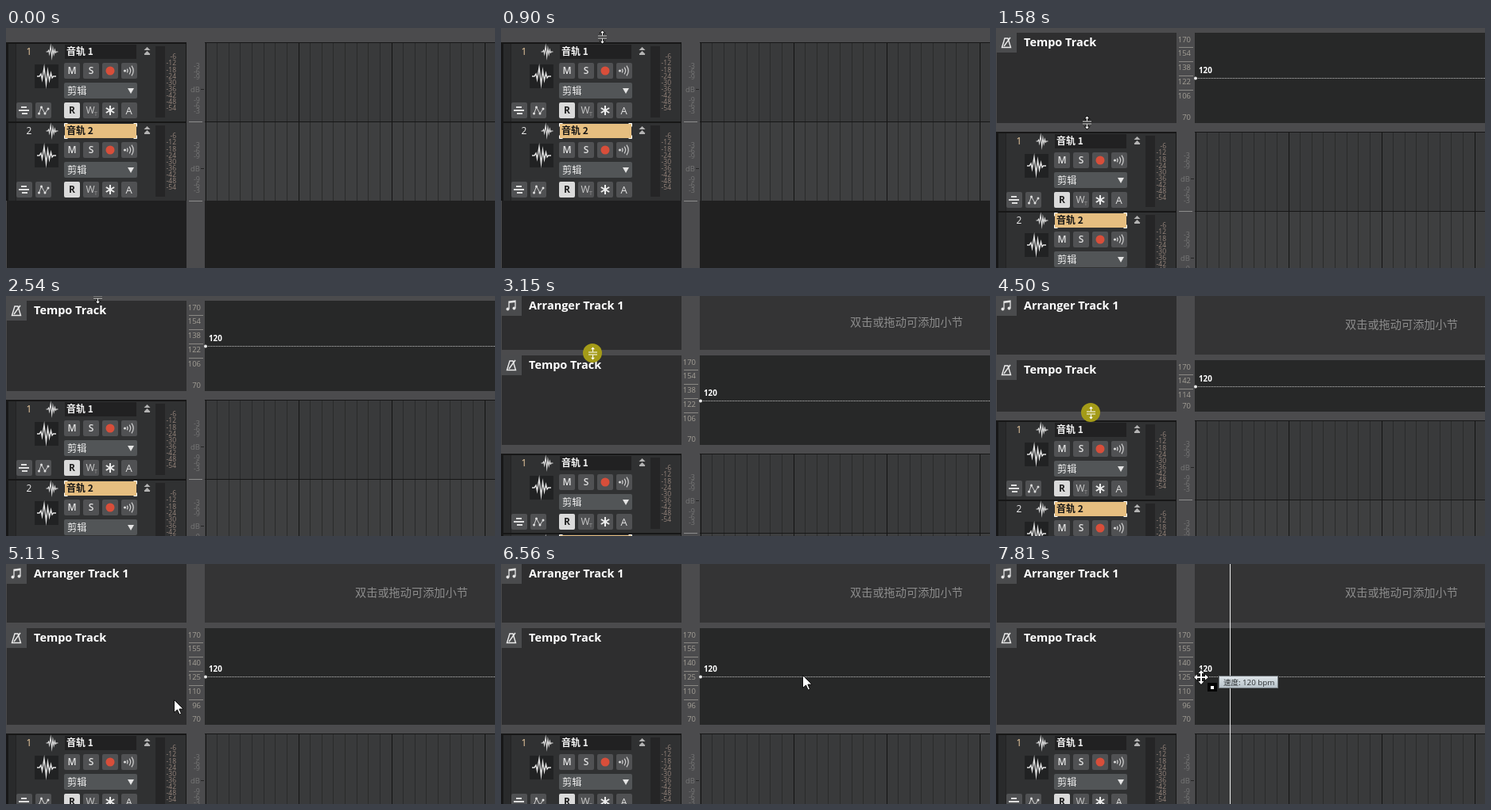
Animation, 615 px wide and 303 px high, one loop 8 s. Source, as an HTML page with a canvas:

```html
<!DOCTYPE html>
<html lang="zh">
<head>
<meta charset="utf-8">
<style>
html, body { margin: 0; width: 100%; height: 100%; overflow: hidden; background: #4b4b4d; }
canvas { display: block; width: 615px; height: 303px; }
</style>
</head>
<body>
<canvas id="stage" width="615" height="303"></canvas>
<script>
const W = 615, H = 303, LOOP = 8000;
const c = document.getElementById('stage').getContext('2d');
const SANS = '"Open Sans", "Noto Sans", sans-serif';
const CJK = '"Noto Sans CJK SC", "Noto Sans CJK", sans-serif';
const GRAY = '#4b4b4d', EDGE = '#171717';

// Bursts of activity: start, end, number of screen updates
const BURSTS = [
  [130, 900, 12], [1100, 1380, 5], [1580, 2200, 9], [2400, 2540, 3],
  [2940, 3150, 4], [3220, 3690, 7], [3760, 3760, 1], [4160, 4500, 5],
  [4700, 5110, 7], [5180, 5380, 4], [5510, 5920, 6], [6220, 6910, 10], [7180, 7810, 10]
];

// Pointer: time, x, y, look
const POINTER = [
  [0, 318, 248, 'none'], [130, 318, 248, 'arrow'], [480, 190, 90, 'arrow'],
  [760, 129, 16, 'arrow'], [830, 127, 11, 'size'], [1100, 127, 11, 'size drag'],
  [1170, 126, 16, 'size drag'], [1380, 113, 119, 'size drag'],
  [1580, 114, 119, 'size'], [1720, 114, 110, 'arrow'], [2200, 114, 9, 'arrow'],
  [2400, 114, 6, 'arrow'], [2470, 115, 1, 'size'], [2940, 115, 4, 'size drag'],
  [3150, 115, 72, 'size drag'], [3220, 115, 79, 'size drag'], [3300, 115, 82, 'arrow'],
  [3690, 116, 186, 'arrow'], [3760, 118, 195, 'size'], [4160, 118, 192, 'size drag'],
  [4415, 119, 145, 'size drag'], [4700, 119, 152, 'size drag'], [4904, 119, 202, 'size drag'],
  [4970, 125, 200, 'arrow'], [5110, 211, 171, 'arrow'], [5380, 258, 122, 'arrow'],
  [5920, 345, 135, 'arrow'], [6450, 421, 140, 'arrow'], [6680, 294, 140, 'arrow drag'],
  [6750, 292, 139, 'arrow'], [6910, 258, 130, 'arrow'], [7180, 257, 124, 'arrow'],
  [7380, 258, 143, 'move'], [7510, 258, 143, 'move drag'], [7730, 258, 143, 'move tip']
];

// Lane edges: time, arranger bottom, tempo bottom
const LANES = [
  [0, -1, 7], [1380, -1, 7], [1580, -1, 120], [2870, -1, 120], [3150, 68, 188],
  [3220, 74, 196], [4100, 74, 196], [4415, 74, 146], [4640, 74, 146], [4904, 74, 203]
];

function screenTime(t) {
  let held = 0;
  for (const [a, b, n] of BURSTS) {
    if (t < a) break;
    const gap = n > 1 ? (b - a) / (n - 1) : 1;
    held = Math.min(b, a + Math.floor((t - a) / gap + 1e-6) * gap);
  }
  return held;
}

function sample(keys, t) {
  let i = keys.length - 1;
  while (i > 0 && keys[i][0] > t + 1e-6) i--;
  const k = keys[i], n = keys[i + 1];
  if (!n) return k.slice(1);
  const p = (t - k[0]) / (n[0] - k[0]);
  return k.slice(1).map((v, j) =>
    typeof v === 'number' ? Math.round(v + (n[j + 1] - v) * p) : v);
}

function box(x, y, w, h, fill) { c.fillStyle = fill; c.fillRect(x, y, w, h); }

function text(s, x, y, size, color, { weight = 400, align = 'left', font = SANS } = {}) {
  c.font = `${weight} ${size}px ${font}`;
  c.textAlign = align;
  c.fillStyle = color;
  c.fillText(s, x, y + size * 0.37);
}

function path(points, color, width = 1, close = false, fill = null) {
  c.beginPath();
  points.forEach(([x, y]) => c.lineTo(x, y));
  if (close) c.closePath();
  if (fill) { c.fillStyle = fill; c.fill(); }
  if (color) { c.strokeStyle = color; c.lineWidth = width; c.stroke(); }
}

function disc(x, y, r, fill) {
  c.beginPath(); c.arc(x, y, r, 0, 7); c.fillStyle = fill; c.fill();
}

function clipped(x, y, w, h, draw) {
  if (h <= 0) return;
  c.save();
  c.beginPath(); c.rect(x, y, w, h); c.clip();
  draw();
  c.restore();
}

function panel(x, y, w, h, fill) {
  c.beginPath(); c.roundRect(x, y, w, h, 2); c.fillStyle = fill; c.fill();
}

function button(x, y, fill = '#505153') { panel(x, y, 20, 20, fill); }

function wave(x, y, k) {
  const points = [[-12, 0], [-9, 0], [-7, -3], [-5.5, 4], [-3, -11], [-0.5, 10],
    [1.5, -7], [3.5, 5], [5.5, -4], [7, 2], [8.5, 0], [12, 0]];
  path(points.map(([u, v]) => [x + u * k, y + v * k]), '#e2e2e2', Math.max(1.1, 1.4 * k));
}

function track(y, n, selected) {
  box(0, y, 227, 100, EDGE);
  box(3, y + 2, 223, 98, '#303132');
  box(3, y + 2, 9, 98, '#292a2b');
  box(12, y + 2, 1, 98, '#232324');

  text(n, 29, y + 12, 12, n === 1 ? '#f0cfa4' : '#ececec', { align: 'center' });
  wave(58, y + 12, 0.62);
  box(74, y + 3, 90, 18, selected ? '#e6be80' : '#212122');
  text('音轨 ' + n, 76, y + 12, 12, selected ? '#161616' : '#f4f4f4', { weight: 700, font: CJK });
  if (selected) {
    for (const [x, d] of [[73.5, 1], [164.5, -1]])
      for (const [v, e] of [[y + 2.5, 1], [y + 21.5, -1]])
        path([[x + d * 4, v], [x, v], [x, v + e * 4]], '#ffffff');
  }
  for (const v of [7, 12])
    path([[173.5, y + v + 3], [177.5, y + v - 1], [181.5, y + v + 3]], null, 1, true, '#b4b4b4');
  box(174, y + 15, 7, 1, '#b4b4b4');

  box(36, y + 28, 30, 30, '#212223');
  wave(51, y + 43, 1);

  const r1 = y + 26, r3 = y + 76;
  [73, 97, 121, 145].forEach(x => button(x, r1));
  text('M', 83, r1 + 10, 12, '#e4e4e4', { weight: 600, align: 'center' });
  text('S', 107, r1 + 10, 12, '#e4e4e4', { weight: 600, align: 'center' });
  disc(131, r1 + 10, 5.5, '#d84e3a');
  disc(149.5, r1 + 10, 1.6, '#d8d8d8');
  for (const r of [4, 7.5, 11]) {
    c.beginPath(); c.arc(149, r1 + 10, r, -0.62, 0.62);
    c.strokeStyle = '#d0d0d0'; c.lineWidth = 1.2; c.stroke();
  }

  panel(73, y + 51, 92, 20, '#525557');
  text('剪辑', 77, y + 61, 12.2, '#f0f0f0', { font: CJK });
  path([[153, y + 58], [161, y + 58], [157, y + 65]], null, 1, true, '#e4e4e4');

  [13, 37, 97, 121, 145].forEach(x => button(x, r3));
  button(73, r3, '#dadada');
  text('R', 83, r3 + 10, 12, '#202020', { weight: 700, align: 'center' });
  text('W', 106, r3 + 10, 12, '#cacaca', { align: 'center' });
  text('T', 113, r3 + 14, 7, '#9a9a9a', { align: 'center' });
  for (let i = 0; i < 3; i++) {
    const a = Math.PI / 2 + i * Math.PI / 3, dx = 6 * Math.cos(a), dy = 6 * Math.sin(a);
    path([[131 - dx, r3 + 10 - dy], [131 + dx, r3 + 10 + dy]], '#ececec', 2);
  }
  text('A', 154.5, r3 + 10, 13, '#e2e2e2', { align: 'center' });
  box(19, r3 + 5, 7, 2, '#dedede');
  box(16, r3 + 9, 8, 2, '#dedede');
  box(21, r3 + 9, 8, 2, '#dedede');
  box(20, r3 + 13, 7, 2, '#dedede');
  const dots = [[41.5, r3 + 14], [44.5, r3 + 6], [49, r3 + 14], [53, r3 + 8]];
  path(dots, '#d4d4d4');
  dots.forEach(([x, v]) => disc(x, v, 1.5, '#e0e0e0'));

  box(188, y + 5, 12, 90, '#252526');
  for (let i = 1; i <= 9; i++)
    text(-6 * i, 214, y + 10 + 8.15 * i, 8.5, '#94837a', { align: 'right' });

  const dim = '#757575';
  [3, 6, 9].forEach((v, i) => {
    text('-' + v, 244, y + 30 + 7 * i, 9, dim, { align: 'right' });
    text('-' + v, 244, y + 87 - 7 * i, 9, dim, { align: 'right' });
  });
  text('dB', 244, y + 59, 9.5, dim, { align: 'right' });
  box(245, y + 59, 4, 1, '#242424');
  box(230, y + 100, 17, 1, '#8c8c8c');

  box(250, y, W - 250, 100, selected ? '#3e3f40' : '#393a3b');
  for (let i = 0; i < 25; i++)
    box(Math.floor(251 + i * 14.625), y, 1, 100, i % 8 ? '#2a2b2b' : '#131313');
  box(250, y, W - 250, 1, EDGE);
}

function lane(top, bottom, title, icon, rightFill) {
  clipped(0, top, W, bottom - top, () => {
    box(1, top, 226, bottom - top, '#2e2e2f');
    box(250, top, W - 250, bottom - top, rightFill);
    box(1, top, 25, 25, '#4a4b4d');
    icon(13, top + 12);
    text(title, 35, top + 12, 14.5, '#ffffff', { weight: 700 });
  });
}

function noteIcon(x, y) {
  path([[x - 3, y + 4], [x - 3, y - 5], [x + 5, y - 6], [x + 5, y + 3]], '#e4e4e4', 1.3);
  path([[x - 3, y - 4], [x + 5, y - 5]], '#e4e4e4', 2);
  disc(x - 4.5, y + 4.5, 2, '#e4e4e4');
  disc(x + 3.5, y + 3.5, 2, '#e4e4e4');
}

function metronomeIcon(x, y) {
  path([[x - 5.5, y + 6.5], [x - 2, y - 5], [x + 2, y - 5], [x + 5.5, y + 6.5]], '#ececec', 1.4, true);
  path([[x - 3, y + 5], [x + 5, y - 6]], '#ececec', 1.4);
}

function tempoLane(top, bottom) {
  lane(top, bottom, 'Tempo Track', metronomeIcon, '#272828');
  const style = { align: 'right' }, color = '#a39f96';
  const span = bottom - top - 1, last = bottom - 8;
  for (let k = 0; top + 8 + 18 * k < last - 10; k++) {
    text(Math.round(170 - 1800 * k / span), 245, top + 8 + 17.9 * k, 9.5, color, style);
    if (k) box(230, top + 18 * k, 18, 1, '#8a8884');
  }
  text(70, 245, last, 9.5, color, style);

  const y = Math.round((top + bottom) / 2);
  c.fillStyle = '#c4c4c4';
  for (let x = 250; x < W; x += 2) c.fillRect(x, y, 1, 1);
  disc(251, y + 0.5, 2, '#e8e8e8');
  text('120', 255, y - 9.5, 9.8, '#ffffff', { weight: 700 });
}

function arrangerLane(bottom) {
  lane(0, bottom, 'Arranger Track 1', noteIcon, '#343435');
  clipped(250, 0, W - 250, bottom, () =>
    text('双击或拖动可添加小节', 439, bottom / 2 - 1, 14.2, '#8c8c8c', { font: CJK }));
}

function outlined(draw, edge = 1.6) {
  if (edge) draw('#101010', edge);
  draw('#ffffff', 0);
}

function sizeCursor(x, y, drag) {
  outlined((col, o) => {
    const w = 1 + o;
    for (const d of [-1, 1]) {
      path([[x - 5.5, y + d * 1.5], [x + 5.5, y + d * 1.5]], col, w);
      path([[x, y + d * 2], [x, y + d * 6]], col, w);
      path([[x - 2.5, y + d * 5.2], [x + 2.5, y + d * 5.2], [x, y + d * 8]], o ? col : null, o, true, col);
    }
  }, drag ? 0 : 1.6);
}

function moveCursor(x, y) {
  outlined((col, o) => {
    path([[x - 7, y], [x + 7, y]], col, 2 + o);
    path([[x, y - 7], [x, y + 7]], col, 2 + o);
    for (const [u, v] of [[1, 0], [-1, 0], [0, 1], [0, -1]])
      path([[x + u * 5 - v * 3.5, y + v * 5 - u * 3.5], [x + u * 9, y + v * 9],
        [x + u * 5 + v * 3.5, y + v * 5 + u * 3.5]], o ? col : null, o, true, col);
  });
  box(x + 8, y + 7, 12, 11, '#050505');
  box(x + 12, y + 11, 4, 4, '#ffffff');
}

function arrowCursor(x, y) {
  path([[0, 0], [0, 16], [4, 12.5], [6.7, 18.5], [9, 17.5], [6.4, 11.6], [11.5, 11.5]]
    .map(([u, v]) => [x + u + 0.5, y + v + 0.5]), '#101010', 1, true, '#ffffff');
}

function tooltip(x, y) {
  const g = c.createLinearGradient(0, y, 0, y + 16);
  g.addColorStop(0, '#dfe6ea');
  g.addColorStop(1, '#b6c1c8');
  box(x, y, 75, 16, '#6f7579');
  box(x + 1, y + 1, 73, 14, g);
  text('速度:', x + 6, y + 8, 9.5, '#2c3032', { font: CJK });
  text('120 bpm', x + 30, y + 8, 9.8, '#2c3032');
}

function pointer(x, y, look) {
  const drag = look.includes('drag');
  if (drag) disc(x, y, 12, '#a49b18');
  if (look.startsWith('size')) sizeCursor(x + 0.5, y + 0.5, drag);
  if (look.startsWith('arrow')) arrowCursor(x, y);
  if (look.startsWith('move')) {
    if (look !== 'move') tooltip(280, 141);
    moveCursor(x, y);
  }
}

function draw(t) {
  const now = screenTime(t);
  const [arr, tempo] = sample(LANES, now);
  const top = tempo + 11;

  box(0, 0, W, H, GRAY);
  box(1, top, 226, H, '#1f1f20');
  box(250, top, W - 250, H, '#202020');
  track(top, 1, false);
  track(top + 100, 2, true);

  if (tempo > 20) tempoLane(arr + 7, tempo);
  if (arr > 0) arrangerLane(arr);
  if (now >= 6680) box(294, 0, 1, H, '#ececec');
  pointer(...sample(POINTER, now));
}

function tick() {
  draw(performance.now() % LOOP);
  requestAnimationFrame(tick);
}
tick();
</script>
</body>
</html>
```
